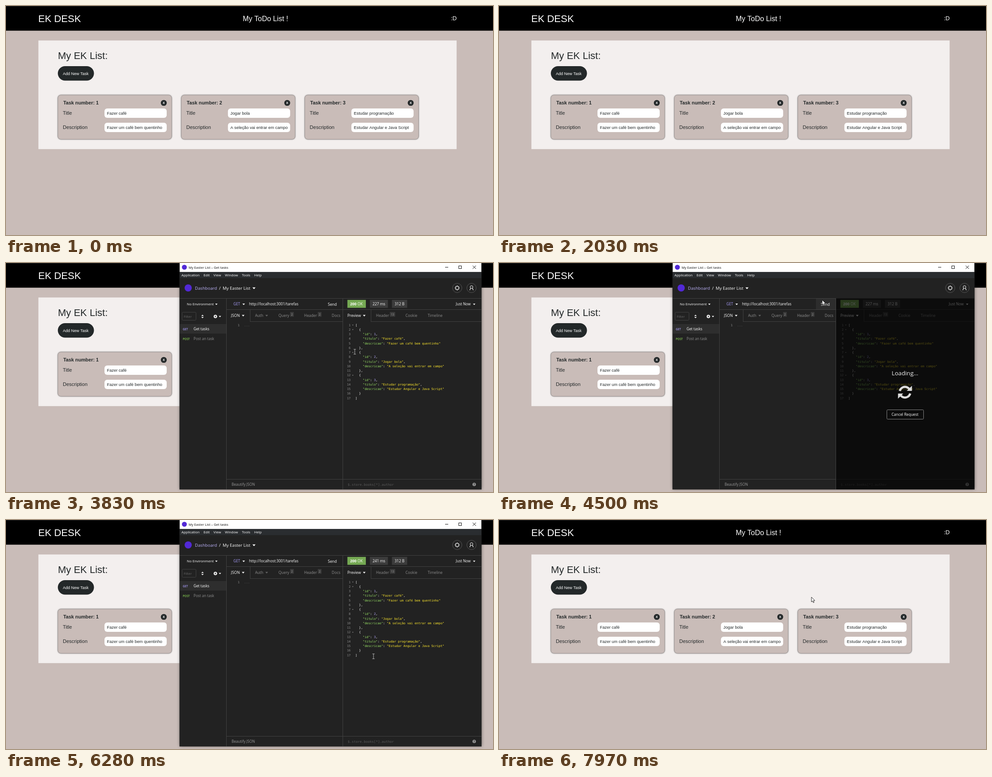
An HTML page with a canvas for the animation above (7.99 s loop, 1088 px wide and 514 px high).

```html
<!DOCTYPE html>
<html lang="en">
<head>
<meta charset="utf-8">
<title>ToDo list</title>
<style>
html, body { margin: 0; width: 100%; height: 100%; overflow: hidden; background: #c9bcb8; }
canvas { display: block; }
</style>
</head>
<body>
<canvas id="stage" width="1088" height="514"></canvas>
<script>
const ctx = document.getElementById('stage').getContext('2d');
const LOOP = 7990;
const OPEN = 2690, SEND = 4500, LOADED = 4800, FOLDS = 5340, CLOSE = 7700;
const ARIAL = '"Liberation Sans", Arial, sans-serif';
const UI = '"Open Sans", "Noto Sans", sans-serif';
const MONO = '"DejaVu Sans Mono", monospace';
const WHITE = '#fff', GREY = '#8e8e8e', LINE = '#424242', DARK = '#232829', PURPLE = '#5229d6';

// Window layout
const LEFT = 388, RIGHT = 1062, BOTTOM = 508, BODY = 79, TABS = 104, CODE = 131, FOOT = 485;
const REQUEST = 492, RESPONSE = 752, SEND_X = 708;

const tasks = [
  ['Fazer café', 'Fazer um café bem quentinho'],
  ['Jogar bola', 'A seleção vai entrar em campo'],
  ['Estudar programação', 'Estudar Angular e Java Script']
];

// Each move runs from the previous end point, pushed sideways by "swing" halfway
const entry = [1035, 516];
const moves = [
  { from: 100, until: 890, end: [262, 240], swing: [0, -120] },
  { from: 910, until: 1690, end: [240, 255], swing: [204, -104] },
  { from: 1720, until: 2030, end: [42, -18] },
  { from: 2030, until: OPEN, end: [74, 520], swing: [-2500, 0] },
  { from: OPEN, until: 3470, end: [817, 276] },
  { from: 3490, until: 4280, end: [722, 83] },
  { from: SEND, until: 5200, end: [749, 330], swing: [-38, 0] },
  { from: 5200, until: 5240, end: [778, 350] },
  { from: FOLDS, until: 6120, end: [826, 312], swing: [132, -180] },
  { from: 6120, until: 6280, end: [821, 306] },
  { from: 6280, until: 6920, end: [930, 138], swing: [82, 0] },
  { from: 7020, until: 7550, end: [984, 10] },
  { from: 7770, until: 7970, end: [698, 173] }
];

function text(str, x, y, size, color = WHITE, font = UI, weight = font === UI ? 500 : 400, align = 'left') {
  ctx.font = `${weight} ${size}px ${font}`;
  ctx.fillStyle = color;
  ctx.textAlign = align;
  ctx.fillText(str, x, y);
  return x + ctx.measureText(str).width;
}

function rect(x, y, w, h, color) {
  ctx.fillStyle = color;
  ctx.fillRect(x, y, w, h);
}

function paint(fill, stroke) {
  if (fill) { ctx.fillStyle = fill; ctx.fill(); }
  if (stroke) { ctx.strokeStyle = stroke; ctx.stroke(); }
}

function round(x, y, w, h, r, fill, stroke) {
  ctx.beginPath();
  ctx.roundRect(x, y, w, h, r);
  paint(fill, stroke);
}

function circle(x, y, r, fill, stroke) {
  ctx.beginPath();
  ctx.arc(x, y, r, 0, Math.PI * 2);
  paint(fill, stroke);
}

function poly(points, fill, stroke) {
  ctx.beginPath();
  points.forEach(([x, y]) => ctx.lineTo(x, y));
  ctx.closePath();
  paint(fill, stroke);
}

function line(x1, y1, x2, y2, color = LINE, width = 1) {
  ctx.beginPath();
  ctx.moveTo(x1, y1);
  ctx.lineTo(x2, y2);
  ctx.lineWidth = width;
  paint(null, color);
  ctx.lineWidth = 1;
}

function hLine(x1, x2, y) { line(x1, y + 0.5, x2, y + 0.5); }
function vLine(x, y1, y2) { line(x + 0.5, y1, x + 0.5, y2); }

function chevron(x, y, color = WHITE, s = 3) {
  poly([[x - s, y - s / 2], [x + s, y - s / 2], [x, y + s / 2 + 0.5]], color);
}

function shadow(color, blur) {
  ctx.shadowColor = color;
  ctx.shadowBlur = blur;
}

function drawCard([title, description], i) {
  ctx.save();
  ctx.translate(i * 275.8, 0);
  shadow('rgba(0,0,0,.55)', 3);
  round(115.8, 199.8, 254.4, 99.4, 7, '#c9bcb8');
  shadow('transparent', 0);
  round(115.8, 199.8, 254.4, 99.4, 7, null, 'rgba(110,105,105,.45)');
  text(`Task number: ${i + 1}`, 128, 221, 10.8, DARK, ARIAL, 700);
  circle(352.5, 217.5, 6.6, DARK);
  text('X', 352.5, 220.3, 7.3, WHITE, ARIAL, 700, 'center');
  [['Title', title], ['Description', description]].forEach(([label, value], row) => {
    const y = row * 32;
    text(label, 127, 244 + y, 11, DARK, ARIAL);
    round(220, 230 + y, 139, 21, 6, WHITE);
    text(value, 225.5, 243.5 + y, 9.3, DARK, ARIAL);
  });
  ctx.restore();
}

function drawPage() {
  rect(0, 0, 1088, 514, '#c9bcb8');
  rect(0, 0, 1088, 55.4, '#000');
  rect(0, 0, 1088, 1, '#252525');
  text('EK DESK', 72, 36, 22, WHITE, ARIAL);
  text('My ToDo List !', 529, 34, 16, WHITE, ARIAL);
  text(':D', 994, 32, 13, WHITE, ARIAL);
  rect(72.4, 77.4, 934.3, 243.8, '#f3efee');
  text('My EK List:', 116, 119, 22, DARK, ARIAL);
  round(115.8, 135, 80.7, 32.4, 16.2, DARK);
  text('Add New Task', 127, 154.5, 9, WHITE, ARIAL);
  tasks.forEach(drawCard);
}

function drawTitleBar() {
  const ink = '#111';
  rect(LEFT, 0, RIGHT - LEFT, 20.3, WHITE);
  circle(398.5, 9.5, 5.5, PURPLE);
  text('My Easter List – Get tasks', 408, 12.5, 7.55, ink);
  line(981, 9.5, 988, 9.5, ink);
  ctx.strokeRect(1011.5, 6.5, 6, 6);
  line(1042.5, 6, 1050, 13, ink);
  line(1050, 6, 1042.5, 13, ink);
  rect(LEFT, 20.3, RIGHT - LEFT, 13.7, '#2a2d30');
  let x = 392;
  for (const label of ['Application', 'Edit', 'View', 'Window', 'Tools', 'Help'])
    x = text(label, x, 30, 7.75) + 8.7;
}

function drawHeader() {
  const y = 56, gear = 1008, user = 1040;
  circle(407, y, 8, PURPLE);
  text('Dashboard', 422, y + 4, 9.6, '#bdb3fa');
  text('/', 476, y + 4, 9.6);
  text('My Easter List', 484, y + 4, 9.6);
  chevron(554, y + 0.5, WHITE, 3.5);
  for (const x of [gear, user]) circle(x, y, 10.5, null, '#555');
  circle(gear, y, 3.6, null, WHITE);
  for (let a = 0; a < Math.PI * 2; a += Math.PI / 4) {
    const c = Math.cos(a), s = Math.sin(a);
    line(gear + c * 3.8, y + s * 3.8, gear + c * 5.4, y + s * 5.4, WHITE, 1.5);
  }
  circle(user, y - 2, 3.1, null, WHITE);
  for (const side of [-1, 1])
    line(user + side * 2, y + 0.5, user + side * 4, y + 5, WHITE, 1.2);
}

function drawSidebar() {
  text('No Environment', 404, 95, 7.9);
  chevron(470, 92.5, WHITE, 2.7);
  round(393.5, 110.5, 31, 18, 2, null, LINE);
  text('Filter', 397, 123, 7.7, '#666');
  for (const side of [-1, 1])
    poly([[436.3, 120 + side], [441.7, 120 + side], [439, 120 + side * 4]], WHITE);
  circle(467.8, 120, 3.8, WHITE);
  line(465.8, 120, 469.8, 120, '#222');
  line(467.8, 118, 467.8, 122, '#222');
  chevron(478, 120, WHITE, 2.7);
  rect(LEFT, 137, REQUEST - LEFT, 21.5, '#2e2e2e');
  [['GET', '#a79cf7', 'Get tasks', WHITE], ['POST', '#86cc52', 'Post an task', GREY]]
    .forEach(([method, tint, name, color], i) => {
      const y = 151 + i * 22;
      text(method, 395, y - 0.5, 6.2, tint, UI, 600);
      text(name, 419, y, 8.2, color);
    });
}

// Lays tabs side by side; the first one is active, a mark is a badge number or an arrow
function drawTabs(x, right, tabs) {
  const pad = 11.5;
  tabs.forEach(([label, mark], i) => {
    let end = text(label, x + pad - (i ? 0 : 0.7), 121, 8.35, i ? GREY : WHITE);
    if (mark === 'arrow') {
      chevron(end + 7.5, 118, i ? '#666' : WHITE, 3);
      end += 11;
    } else if (mark) {
      const w = 4.5 + 3.7 * mark.length;
      rect(end + 2, 110, w, 10.5, '#3b3b3b');
      text(mark, end + 2 + w / 2, 118, 6.3, '#999', UI, 400, 'center');
      end += 2 + w;
    }
    x = end + pad;
    if (i === 0) {
      vLine(Math.round(x), TABS, CODE);
      hLine(Math.round(x), right, CODE);
    }
  });
}

function drawRequest(hover) {
  text('GET', 508, 95, 8.2, '#a79cf7');
  chevron(531, 92.5, WHITE, 2.8);
  text('http://localhost:3001/tarefas', 543, 95, 8.3);
  if (hover) rect(SEND_X, BODY + 1, RESPONSE - SEND_X, TABS - BODY - 1, '#2d2d2d');
  text('Send', 719, 95.5, 8.6);
  drawTabs(REQUEST, RESPONSE, [['JSON', 'arrow'], ['Auth', 'arrow'], ['Query', '2'], ['Header', '2'], ['Docs']]);
  text('1', 522, 141.8, 6.88, GREY, MONO, 400, 'right');
  text('...', 532, 141.8, 6.88, '#666', MONO);
  text('Beautify JSON', 504, 500, 8.1, '#999');
}

function buildJson() {
  const rows = [[0, ['[', WHITE]]];
  const field = (key, value, color, end) =>
    [4, [`"${key}"`, '#9be566'], [': ', WHITE], [value, color], [end, WHITE]];
  tasks.forEach(([title, description], i) => rows.push(
    [2, ['{', WHITE]],
    field('id', `${i + 1}`, '#b5a8ff', ','),
    field('titulo', `"${title}"`, '#ffe92e', ','),
    field('descricao', `"${description}"`, '#ffe92e', ''),
    [2, [i < tasks.length - 1 ? '},' : '}', WHITE]]
  ));
  return [...rows, [0, [']', WHITE]]];
}
const json = buildJson();

function drawJson(folds) {
  const step = 4.14;
  json.forEach(([indent, ...parts], i) => {
    const y = 141.6 + i * 10.25;
    const opens = '[{'.includes(parts[0][0]);
    text(i + 1, 770, y, 6.88, GREY, MONO, 400, 'right');
    if (opens && (folds || i === 0)) chevron(774.8, y - 2.3, '#888', 1.6);
    let x = 780.5 + indent * step;
    for (const [str, color] of parts) x = text(str, x, y, 6.88, color, MONO);
  });
}

function drawResponse(t) {
  let x = RESPONSE + 10.7;
  ['200 OK', t < LOADED ? '227 ms' : '241 ms', '312 B'].forEach((label, i) => {
    ctx.font = `500 8.4px ${UI}`;
    const w = ctx.measureText(label).width + (i ? 12 : 13);
    rect(x, 82.8, w, 17.8, i ? '#3c3c3c' : '#75a953');
    const [value, unit] = label.split(' ');
    const end = text(value, x + 6, 95, 8.4, WHITE, UI, i ? 500 : 700);
    text(unit, end + 2.2, 95, 8.4);
    x += w + 9;
  });
  text('Just Now', 1005, 95, 8.1);
  chevron(1046, 92.5, WHITE, 2.7);
  drawTabs(RESPONSE, RIGHT, [['Preview', 'arrow'], ['Header', '13'], ['Cookie'], ['Timeline']]);
  drawJson(t < LOADED || t >= FOLDS);
  text('$.store.books[*].author', 763.5, 499.5, 7.44, '#595959', MONO);
  circle(1046, 497, 3.8, '#999');
  text('?', 1046, 499.5, 6.5, '#222', UI, 700, 'center');
}

function drawLoading(t) {
  const x = 907;
  rect(RESPONSE + 1, BODY, RIGHT - RESPONSE - 1, BOTTOM - BODY, 'rgba(0,0,0,.66)');
  text('Loading...', x, 252, 13.2, '#f2f2f2', UI, 500, 'center');
  ctx.save();
  ctx.translate(x, 290);
  ctx.rotate((t - SEND) / 2000 * Math.PI * 2);
  for (let i = 0; i < 2; i++) {
    ctx.lineWidth = 4.8;
    ctx.beginPath();
    ctx.arc(0, 0, 12, -2.9, -0.65);
    paint(null, '#ddd');
    poly([[15.5, -14.5], [15.5, -3], [4, -3]], '#ddd');
    ctx.rotate(Math.PI);
  }
  ctx.restore();
  round(866.5, 329.5, 82, 21, 2, null, '#888');
  text('Cancel Request', x, 343, 8.4, WHITE, UI, 500, 'center');
}

function drawWindow(t, pointer) {
  const hover = t >= SEND && pointer.x >= SEND_X && pointer.x < RESPONSE && pointer.y < TABS;
  shadow('rgba(0,0,0,.45)', 7);
  rect(LEFT - 0.5, 0, RIGHT - LEFT + 1, BOTTOM + 0.4, '#222');
  shadow('transparent', 0);
  drawTitleBar();
  drawHeader();
  drawSidebar();
  ctx.save();
  ctx.beginPath();
  ctx.rect(REQUEST, BODY, RESPONSE - REQUEST, BOTTOM - BODY);
  ctx.clip();
  drawRequest(hover);
  ctx.restore();
  drawResponse(t);
  hLine(LEFT, RIGHT, BODY);
  for (const y of [TABS, FOOT]) hLine(REQUEST, RIGHT, y);
  for (const x of [REQUEST, RESPONSE]) vLine(x, BODY, BOTTOM);
  if (t >= SEND && t < LOADED) drawLoading(t);
}

function pointerAt(t) {
  let [x, y] = entry;
  for (const { from, until, end, swing = [0, 0] } of moves) {
    if (t < from) break;
    const u = Math.min(1, (t - from) / (until - from));
    const e = u * u * (3 - 2 * u), push = Math.sin(Math.PI * e);
    x += (end[0] - x) * e + swing[0] * push;
    y += (end[1] - y) * e + swing[1] * push;
    if (u < 1) break;
  }
  return { x, y };
}

function overText({ x, y }, open) {
  if (open && x > LEFT) {
    const editor = x > REQUEST && x < RIGHT && y > CODE && y < FOOT;
    const address = x > 540 && x < SEND_X && y > BODY && y < TABS;
    return editor || address;
  }
  const column = (x - 220) % 275.8, row = (y - 230) % 32;
  return x < 911 && y < 283 && column > 0 && column < 139 && row > 0 && row < 21;
}

function drawPointer({ x, y }, open) {
  if (overText({ x, y }, open)) {
    const ink = open ? '#bbb' : '#222';
    line(x, y - 5, x, y + 5, ink);
    for (const side of [-5.5, 5.5]) line(x - 2.5, y + side, x + 2.5, y + side, ink);
    return;
  }
  ctx.save();
  ctx.translate(x, y);
  ctx.lineWidth = 0.9;
  poly([[0, 0], [0, 11], [2.5, 8.7], [4.2, 12.6], [6, 11.8], [4.3, 8], [7.7, 7.8]], WHITE, '#111');
  ctx.restore();
}

function draw(t) {
  const open = t >= OPEN && t < CLOSE;
  const pointer = pointerAt(t);
  drawPage();
  if (open) drawWindow(t, pointer);
  drawPointer(pointer, open);
}

const start = performance.now();
function tick() {
  draw((performance.now() - start) % LOOP);
  requestAnimationFrame(tick);
}
tick();
</script>
</body>
</html>
```
